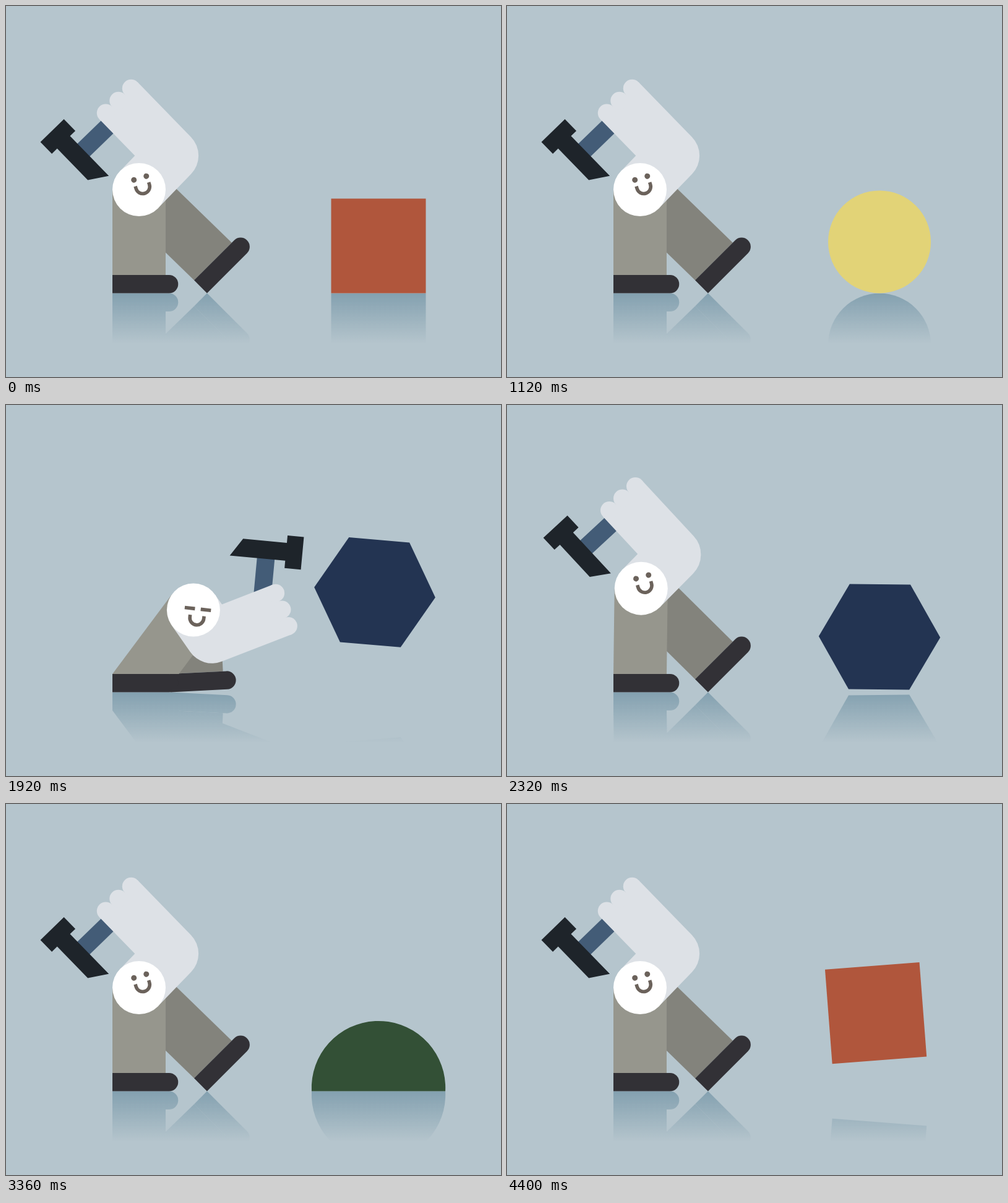
Animation, 800 px wide and 600 px high, one loop 4.48 s. Source, as an HTML page with a canvas:

```html
<!DOCTYPE html>
<html lang="en">
<head>
<meta charset="utf-8">
<title>Hammer loop</title>
<style>
  html, body { margin: 0; width: 100%; height: 100%; overflow: hidden; background: #b5c5cd; }
  canvas { display: block; }
</style>
</head>
<body>
<canvas id="stage" width="800" height="600"></canvas>
<script>
const BEAT = 1120, LOOP = BEAT * 4, FLOOR = 464.5, RAD = Math.PI / 180;
const stage = document.getElementById('stage').getContext('2d');
const mirror = document.createElement('canvas');
mirror.width = 800;
mirror.height = 600;
const glass = mirror.getContext('2d');

const mix = (a, b, k) => a + (b - a) * k;
const span = (t, a, b) => Math.min(1, Math.max(0, (t - a) / (b - a)));
const inOut = (u, p) => u < 0.5 ? 2 ** (p - 1) * u ** p : 1 - 2 ** (p - 1) * (1 - u) ** p;
const polar = (x, y, len, deg) => [x + len * Math.cos(deg * RAD), y + len * Math.sin(deg * RAD)];

// Shapes: height, colour, distance from pivot to base, outline around the pivot
const SHAPES = [
  { h: 153, low: 76.5, color: '#b0563c', path: c => c.rect(-76.5, -76.5, 153, 153) },
  { h: 166, low: 83, color: '#e2d377', path: c => c.arc(0, 0, 83, 0, 7) },
  { h: 170, low: 85, color: '#233452', path: c => {
    for (let i = 0; i < 6; i++) c.lineTo(...polar(0, 0, 98.2, i * 60));
  } },
  { h: 113.5, low: 5.3, color: '#335036', path: c => {
    const a = Math.asin(5.3 / 108.2);
    c.arc(0, 0, 108.2, Math.PI - a, a);
  } }
];

// Key poses. Legs: direction, heel offset, foot turn, heel distance
const READY = {
  body: { x: 215, y: 297, fx: 6, fy: -4.8, fa: -17 },
  arm: { torso: -46, torsoLen: 76.5, fore: -134.2, foreLen: 124, bend: 0, tilt: 0, slide: 18 },
  front: [90, 17.3, 90, 144.5], back: [44.4, 14.4, 89.4, 171.8]
};
const HIT = {
  body: { x: 425.3, y: 248, fx: 6, fy: 13.5, fa: 79 },
  arm: { torso: 45, torsoLen: 85, fore: 90, foreLen: 77, bend: 132, tilt: 0, slide: 14.5 },
  front: [225.3, 14.4, 90.3, 172.5], back: [-44.5, 14.4, 89.5, 174]
};
const CROUCH = {
  body: { x: 309, y: 334, fx: 5.5, fy: 14, fa: 8 },
  arm: { torso: 62, torsoLen: 51, fore: -13.4, foreLen: 121, bend: 0, tilt: 28.4, slide: 39 },
  front: [129.2, 14.4, 129.2, 170], back: [92.3, 22.7, 92.3, 111]
};

function blend(a, b, k) {
  const out = {};
  for (const key in a) out[key] = mix(a[key], b[key], k);
  return out;
}

function swingLeg(a, b, k, side, body) {
  const [dir, off, turn, len] = a.map((v, i) => mix(v, b[i], k));
  const [x, y] = polar(body.x, body.y, len, dir + side * off);
  return { x, y, a: dir - side * turn, side };
}

function plant(leg, x, y, w) {
  leg.x = mix(x, leg.x, w);
  leg.y = mix(y, leg.y, w);
  return leg;
}

function poseAt(p) {
  if (p < 520) {
    const k = span(p, 0, 400) ** 3, ka = span(p, 0, 440) ** 3;
    const q = inOut(span(p, 120, 400), 2), w = Math.min(1, q * 3);
    const body = blend(READY.body, HIT.body, k), arm = blend(READY.arm, HIT.arm, ka);
    body.y += 50 * Math.sin(Math.PI * k) ** 2;
    const reach = 14 * Math.sin(Math.PI * ka);
    arm.torsoLen += reach;
    arm.foreLen += reach;
    return {
      body, arm,
      front: plant(swingLeg(READY.front, HIT.front, q, 1, body), 172, 435, w),
      back: plant(swingLeg(READY.back, HIT.back, q, q > 0.5 ? -1 : 1, body), 304, 443.6, w)
    };
  }
  if (p < 720) {
    const k = inOut(span(p, 520, 720), 3);
    const body = blend(HIT.body, CROUCH.body, k);
    return {
      body, arm: blend(HIT.arm, CROUCH.arm, k),
      front: swingLeg(HIT.front, CROUCH.front, k, 1, body),
      back: swingLeg(HIT.back, CROUCH.back, k, k < 0.5 ? -1 : 1, body)
    };
  }
  const k = inOut(span(p, 720, 1040), 3), a = -45 * k;
  return {
    body: blend(CROUCH.body, READY.body, k),
    arm: blend(CROUCH.arm, READY.arm, k),
    front: { x: 172, y: 435, a: 0, side: 1 },
    back: { x: mix(262, 304, k), y: FLOOR - 29.5 * Math.cos(a * RAD), a, side: 1 }
  };
}

function poly(c, color, points) {
  c.fillStyle = color;
  c.beginPath();
  points.forEach(q => c.lineTo(...q));
  c.fill();
}

function drawLeg(c, leg, body, color) {
  const dx = body.x - leg.x, dy = body.y - leg.y, dist = Math.max(44, Math.hypot(dx, dy));
  const a = Math.atan2(dy, dx) - leg.side * Math.asin(43 / dist);
  const len = Math.sqrt(dist * dist - 43 * 43);
  const ux = Math.cos(a), uy = Math.sin(a), nx = -uy * leg.side, ny = ux * leg.side;
  const fx = Math.cos(leg.a * RAD), fy = Math.sin(leg.a * RAD);
  const cut = 86 / Math.max(0.5, fx * nx + fy * ny);
  const tx = leg.x + ux * len, ty = leg.y + uy * len;
  poly(c, color, [[leg.x, leg.y], [tx, ty], [tx + 86 * nx, ty + 86 * ny],
    [leg.x + fx * cut, leg.y + fy * cut]]);
}

function drawShoe(c, leg) {
  c.save();
  c.translate(leg.x, leg.y);
  c.rotate(leg.a * RAD);
  c.scale(1, leg.side);
  c.fillStyle = '#323136';
  c.beginPath();
  c.moveTo(0, 0);
  c.arc(91.5, 14.75, 14.75, -Math.PI / 2, Math.PI / 2);
  c.lineTo(0, 29.5);
  c.fill();
  c.restore();
}

function drawArm(c, body, arm) {
  const elbow = polar(body.x, body.y, arm.torsoLen, arm.torso);
  const hand = polar(...elbow, arm.foreLen, arm.fore);

  c.save();
  c.translate(...polar(...hand, -arm.slide, arm.fore));
  c.rotate((arm.fore + arm.tilt - 90) * RAD);
  c.fillStyle = '#435c77';
  c.fillRect(15, -14.3, 83, 28.6);
  poly(c, '#1e242a', [[96, -58.5], [125, -39.5], [125, 31.5], [137, 31.5],
    [137, 58], [84, 58], [84, 31.5], [96, 31.5]]);
  c.restore();

  const turn = Math.abs(arm.fore - arm.torso) * RAD;
  const fit = Math.min(arm.torsoLen, arm.foreLen) / Math.max(0.05, Math.abs(Math.tan(turn / 2)));
  c.strokeStyle = c.fillStyle = '#dde1e6';
  c.lineWidth = 86;
  c.lineJoin = 'round';
  c.beginPath();
  c.moveTo(body.x, body.y);
  c.arcTo(...elbow, ...hand, Math.min(arm.bend, fit));
  c.lineTo(...hand);
  c.stroke();
  for (const side of [-28.6, 0, 28.6]) {
    c.beginPath();
    c.arc(...polar(...hand, side, arm.fore + 90), 14.4, 0, 7);
    c.fill();
  }
}

function drawHead(c, body, shut) {
  c.save();
  c.translate(body.x, body.y);
  c.fillStyle = '#fff';
  c.beginPath();
  c.arc(0, 0, 43, 0, 7);
  c.fill();
  c.translate(body.fx, body.fy);
  c.rotate(body.fa * RAD);
  c.fillStyle = c.strokeStyle = '#6b625b';
  for (const side of [-1, 1]) {
    c.beginPath();
    if (shut) c.rect(side * 13 - 8.3, -17.4, 16.6, 5.6);
    else c.arc(side * 10.5, -14.6, 4.5, 0, 7);
    c.fill();
  }
  c.lineWidth = 5.6;
  c.beginPath();
  c.moveTo(11.3, -4);
  c.arc(0, 0, 11.3, 0, Math.PI);
  c.lineTo(-11.3, -4);
  c.stroke();
  c.restore();
}

function drawShape(c, p, beat) {
  const shape = SHAPES[(beat + (p < 440 ? 0 : 1)) % 4];
  c.fillStyle = shape.color;
  if (p >= 440 && p < 654) {
    c.fillRect(512, FLOOR - 36.3, 168, 36.3);
    return;
  }
  let x, lift, turn, squash;
  if (p < 440) {
    const hop = p < 160 ? Math.sin(Math.PI * p / 160) : 0;
    const press = span(p, 410, 440);
    x = mix(602, 596, press);
    lift = 4.5 * hop;
    turn = 0.6 * hop;
    squash = mix(1, 36.3 / shape.h, press);
  } else {
    x = mix(596, 602, span(p, 1040, BEAT));
    lift = 88.6 * (1 - ((p - 887) / 233) ** 2);
    turn = 360 * inOut(span(p, 720, BEAT), 4);
    squash = mix(36.3 / shape.h, 1, span(p, 654, 700));
  }
  c.save();
  c.translate(x, FLOOR - lift);
  c.scale(1, squash);
  c.translate(0, -shape.low);
  c.rotate(turn * RAD);
  c.beginPath();
  shape.path(c);
  c.fill();
  c.restore();
}

function drawScene(c, p, beat) {
  const { body, arm, front, back } = poseAt(p);
  drawShape(c, p, beat);
  drawLeg(c, back, body, '#83837c');
  drawShoe(c, back);
  drawLeg(c, front, body, '#96968d');
  drawShoe(c, front);
  drawArm(c, body, arm);
  drawHead(c, body, p >= 600 && p < 860);
}

const fade = glass.createLinearGradient(0, FLOOR, 0, 545);
fade.addColorStop(0, 'rgba(131,160,175,1)');
fade.addColorStop(1, 'rgba(131,160,175,0)');

function drawReflection(p, beat) {
  glass.clearRect(0, 0, 800, 600);
  glass.save();
  glass.beginPath();
  glass.rect(0, FLOOR, 800, 600 - FLOOR);
  glass.clip();
  glass.transform(1, 0, 0, -1, 0, FLOOR * 2);
  drawScene(glass, p, beat);
  glass.restore();
  glass.globalCompositeOperation = 'source-in';
  glass.fillStyle = fade;
  glass.fillRect(0, 0, 800, 600);
  glass.globalCompositeOperation = 'source-over';
  stage.drawImage(mirror, 0, 0);
}

const start = performance.now();
function tick() {
  const t = (performance.now() - start) % LOOP;
  const beat = Math.floor(t / BEAT), p = t % BEAT;
  stage.fillStyle = '#b5c5cd';
  stage.fillRect(0, 0, 800, 600);
  drawReflection(p, beat);
  drawScene(stage, p, beat);
  requestAnimationFrame(tick);
}
tick();
</script>
</body>
</html>
```
